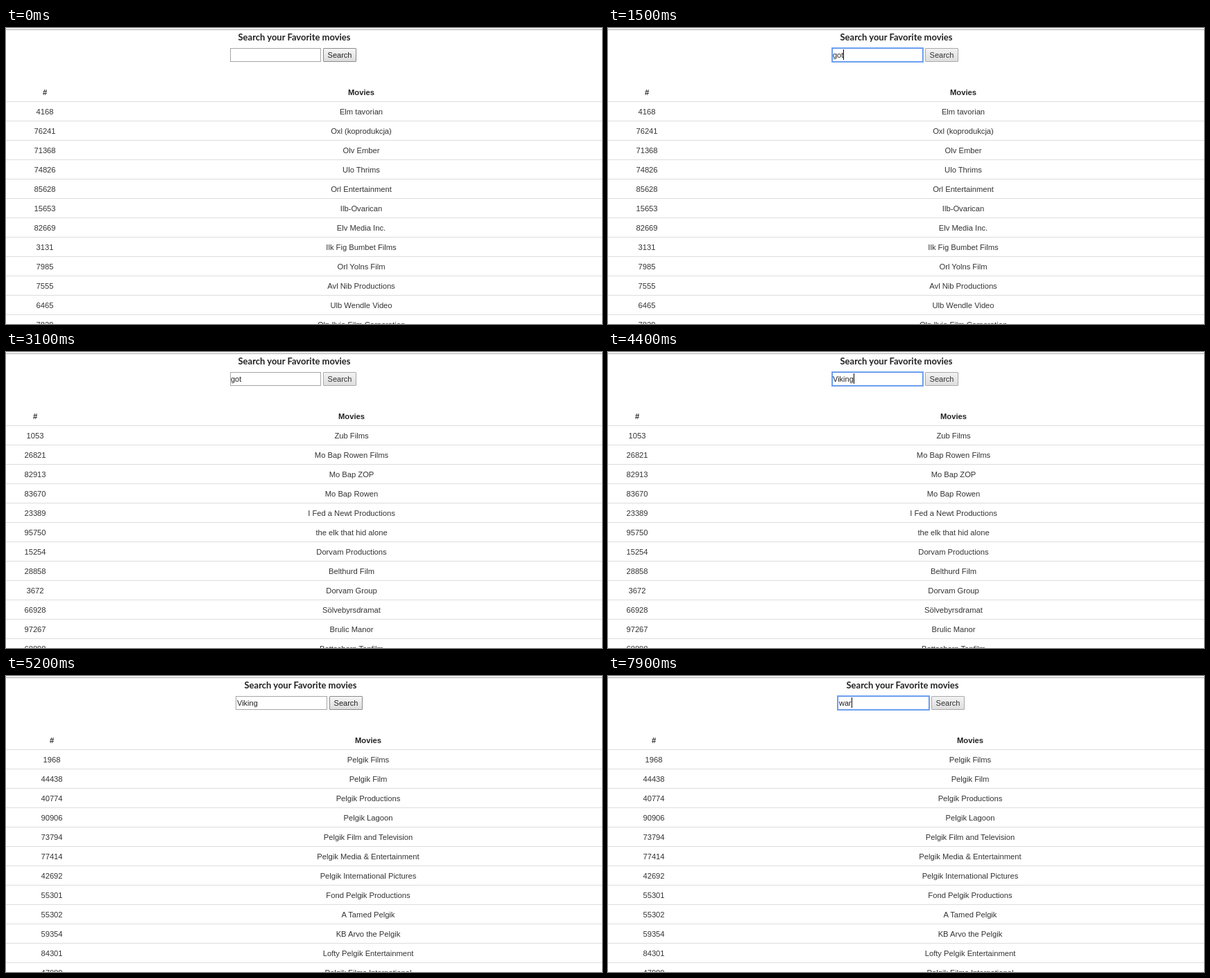
These frames come from a looping animation (859x428 px, 8 s). An HTML page:

```html
<!DOCTYPE html>
<html lang="en">
<head>
<meta charset="utf-8">
<title>Movie search</title>
<style>
  html, body { margin: 0; width: 100%; height: 100%; overflow: hidden; background: #fff; }
  body { position: relative; font: 11.2px/28px "Liberation Sans", Arial, sans-serif; color: #333; }
  div { position: absolute; box-sizing: border-box; white-space: pre; }
  #bar { left: 0; top: 0; width: 100%; height: 3px; background: #f2f2f2; border-bottom: 1px solid #b4b4b4; }
  #title { top: 3px; width: 240px; text-align: center; font: 700 13px/20px "Comic Sans MS", "Comic Neue", Lato, sans-serif; color: #222; }
  #field { top: 29px; height: 20px; border: 1px solid #a6a6a6; background: #fff; }
  #field.focus { box-shadow: 0 0 0 1px #7fabf3; border-color: #5b93ec; }
  #value { top: 31px; height: 15px; font-size: 11px; line-height: 16px; color: #222; }
  #value.picked { background: #3390ff; color: #fff; }
  #caret { position: absolute; left: 100%; top: 0; width: 1px; height: 15px; background: #000; }
  #button { top: 29px; width: 48px; height: 20px; border: 1px solid #a9a9a9; border-radius: 1px;
    background: linear-gradient(#f2f2f2, #dedede); font-size: 11px; line-height: 18px; text-align: center; color: #333; }
  #button.hover { border-color: #8a8a8a; background: linear-gradient(#f6f6f6, #dcdcdc); color: #222; }
  #button.press { border-color: #8a8a8a; background: linear-gradient(#dcdcdc, #ececec); color: #222; }
  .row { left: 0; width: 100%; height: 28px; border-bottom: 1px solid #ddd; }
  .row div { width: 300px; text-align: center; top: 0; }
  .head { font-weight: 700; color: #222; }
</style>
</head>
<body>
<div id="bar"></div>
<div id="title">Search your Favorite movies</div>
<div id="field"></div>
<div id="value"><span id="text"></span><i id="caret"></i></div>
<div id="button">Search</div>
<div id="table"></div>
<script>
const LOOP = 8000;
const $ = id => document.getElementById(id);

// Each page: column centres, form layout, result rows
const pages = [
  { id: 56, name: 512, title: 415.5, field: 323, width: 131, text: 324, button: 457, rows: `4168 Elm tavorian
76241 Oxl (koprodukcja)
71368 Olv Ember
74826 Ulo Thrims
85628 Orl Entertainment
15653 Ilb-Ovarican
82669 Elv Media Inc.
3131 Ilk Fig Bumbet Films
7985 Orl Yolns Film
7555 Avl Nib Productions
6465 Ulb Wendle Video
7829 Olp Ilvio Film Corporation` },
  { id: 42, name: 498, title: 415.5, field: 323, width: 131, text: 324, button: 457, rows: `1053 Zub Films
26821 Mo Bap Rowen Films
82913 Mo Bap ZOP
83670 Mo Bap Rowen
23389 I Fed a Newt Productions
95750 the elk that hid alone
15254 Dorvam Productions
28858 Belthurd Film
3672 Dorvam Group
66928 Sölvebyrsdramat
97267 Brulic Manor
68898 Bettschorn Tonfilm` },
  { id: 66, name: 522, title: 424.5, field: 331, width: 132, text: 333, button: 466, rows: `1968 Pelgik Films
44438 Pelgik Film
40774 Pelgik Productions
90906 Pelgik Lagoon
73794 Pelgik Film and Television
77414 Pelgik Media & Entertainment
42692 Pelgik International Pictures
55301 Fond Pelgik Productions
55302 A Tamed Pelgik
59354 KB Arvo the Pelgik
84301 Lofty Pelgik Entertainment
47989 Pelgik Films International` }
];

// Time, then what changes: page, text, field (blur, focus, caret, picked), button
const steps = [
  [0, { page: 0, text: '', field: 'blur', button: 'hover' }],
  [100, { button: '' }],
  [200, { field: 'focus' }],
  [300, { field: 'caret' }],
  [900, { field: 'focus' }],
  [1000, { text: 'g', field: 'caret' }],
  [1200, { text: 'go' }],
  [1500, { text: 'got' }],
  [2000, { field: 'focus' }],
  [2300, { button: 'hover' }],
  [2400, { field: 'blur', button: 'press' }],
  [2500, { button: 'hover' }],
  [2900, { button: '' }],
  [3100, { page: 1 }],
  [3800, { field: 'caret' }],
  [4200, { field: 'picked' }],
  [4400, { text: 'Viking', field: 'caret' }],
  [4600, { button: 'hover' }],
  [4900, { field: 'focus' }],
  [5100, { field: 'blur', button: 'press' }],
  [5200, { page: 2, button: 'hover' }],
  [5700, { button: '' }],
  [6200, { field: 'caret' }],
  [6300, { field: 'picked' }],
  [7500, { text: 'w', field: 'caret' }],
  [7600, { text: 'wa' }],
  [7900, { text: 'war' }]
];

const cell = (centre, text) => {
  const el = document.createElement('div');
  el.style.left = centre - 150 + 'px';
  el.textContent = text;
  return el;
};

function buildTable(page) {
  const lines = ['# Movies', ...page.rows.split('\n')];
  return lines.map((line, i) => {
    const row = document.createElement('div');
    const gap = line.indexOf(' ');
    row.className = i ? 'row' : 'row head';
    row.style.top = 79 + 28 * i + 'px';
    row.append(cell(page.id, line.slice(0, gap)), cell(page.name, line.slice(gap + 1)));
    return row;
  });
}

function showPage(page) {
  const left = (id, x) => { $(id).style.left = x + 'px'; };
  left('title', page.title - 120);
  left('field', page.field);
  left('value', page.text);
  left('button', page.button);
  $('field').style.width = page.width + 'px';
  $('table').replaceChildren(...buildTable(page));
}

$('table').style.cssText = 'left:0;top:0;width:100%;height:100%';
let shownPage = -1, shownStep = -1;

function draw(time) {
  const last = steps.findLastIndex(([at]) => at <= time);
  if (last === shownStep) return;
  shownStep = last;
  const state = Object.assign({}, ...steps.slice(0, last + 1).map(step => step[1]));
  if (state.page !== shownPage) showPage(pages[shownPage = state.page]);
  $('text').textContent = state.text;
  $('field').className = state.field === 'blur' ? '' : 'focus';
  $('value').className = state.field === 'picked' ? 'picked' : '';
  $('caret').hidden = state.field !== 'caret';
  $('caret').style.display = state.field === 'caret' ? 'block' : 'none';
  $('button').className = state.button;
}

const start = performance.now();
function tick() {
  draw((performance.now() - start) % LOOP);
  requestAnimationFrame(tick);
}
tick();
</script>
</body>
</html>
```
